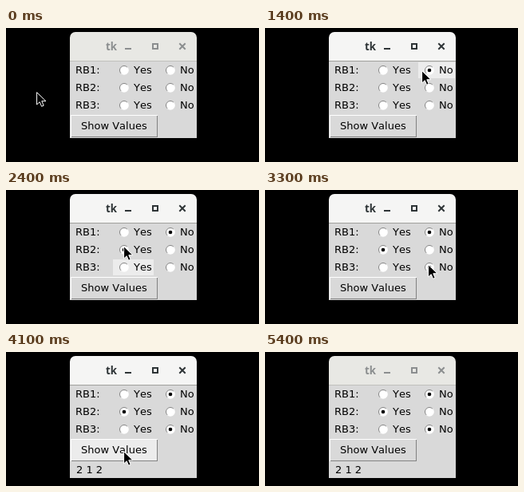
An HTML page that plays this animation: 317x168 px, repeating every 5.5 s.

```html
<!DOCTYPE html>
<html lang="en">
<head>
<meta charset="utf-8">
<title>Radio buttons</title>
<style>
  html, body { margin: 0; width: 100%; height: 100%; overflow: hidden; background: #000; }
  svg { display: block; width: 317px; height: 168px; }
  text {
    font: 13px "DejaVu Sans", Verdana, sans-serif;
    font-kerning: none;
    fill: #000;
    white-space: pre;
  }
  #bar { --ink: #2e3436; --fill: #f5f5f4; --edge: #a1a19d; }
  #bar.idle { --ink: #8b8e8f; --fill: #e8e8e4; --edge: #c0c0bd; }
  #bar text { font: bold 13.3px "Open Sans", "Noto Sans", sans-serif; fill: var(--ink); }
  #bar .icon { fill: none; stroke: var(--ink); stroke-width: 2; }
  .crisp { shape-rendering: crispEdges; }
</style>
</head>
<body>
<svg id="stage" viewBox="0 0 317 168" xmlns="http://www.w3.org/2000/svg">
  <rect width="317" height="168"/>
  <rect id="body" class="crisp" x="80" y="42" width="159" height="96" fill="#d9d9d9"/>
  <g id="bar">
    <path d="M80 42V12a7 7 0 0 1 7-7H232a7 7 0 0 1 7 7V42Z" fill="var(--fill)"/>
    <rect class="crisp" x="80" y="41" width="159" height="1" fill="var(--edge)"/>
    <text x="125" y="28">tk</text>
    <path class="icon crisp" d="M149 26h8M184 20h6v6h-6Z"/>
    <path class="icon" stroke-linecap="square" d="M218 20l6 6M224 20l-6 6"/>
  </g>
  <rect id="hover" class="crisp" height="20" fill="#ececec"/>
  <g id="rows"></g>
  <g id="button" class="crisp">
    <rect id="face" x="82" y="110" width="107" height="26"/>
    <path id="lit" d="M81 137V109H190L189 110H82V136Z"/>
    <path id="shade" d="M190 109V137H81L82 136H189V110Z"/>
  </g>
  <text id="caption" x="94" y="127">Show Values</text>
  <text id="result" x="88" y="152">2 1 2</text>
  <path id="cursor" d="M.6 1.7V17L4.2 13.7L6.6 19.3L9.2 18.2L6.8 12.7H12Z"
        fill="#000" stroke="#fff" stroke-linejoin="round"/>
</svg>
<script>
const LOOP = 5500;
const $ = id => document.getElementById(id);
const set = (el, attrs) => {
  for (const key in attrs) el.setAttribute(key, attrs[key]);
  return el;
};
const add = (parent, tag, attrs, text = "") => {
  const el = set(document.createElementNS("http://www.w3.org/2000/svg", tag), attrs);
  el.textContent = text;
  return parent.appendChild(el);
};
const show = (el, on) => { el.style.display = on ? "" : "none"; };

// Pointer tip: time, x, y
const pointer = [
  [0, 38, 79], [300, 59, 75],
  [500, 84, 73], [600, 132, 65], [700, 182, 55], [800, 196, 52],
  [1500, 182, 57], [1600, 159, 65], [1700, 147, 69],
  [2500, 154, 83], [2600, 188, 91], [2700, 204, 92],
  [3400, 195, 97], [3500, 176, 108], [3600, 157, 117], [3700, 147, 123],
  [4800, 148, 93], [4900, 152, 1], [5000, 152, -40]
];

// Hovered widget: time, name ("" for none)
const hovers = [
  [0, ""], [700, "No1"], [1500, ""], [1600, "Yes2"],
  [2400, "Yes3"], [2500, "No3"], [3300, ""], [3500, "button"],
  [4700, "Yes3"], [4800, ""]
];

const at = (steps, t) => steps.findLast(step => step[0] <= t);
const within = (t, from, to) => t >= from && t < to;

function radio(x, y) {
  const rows = $("rows");
  add(rows, "circle", { cx: x, cy: y, r: 5.8, fill: "#fff" });
  add(rows, "path", {
    d: `M${x - 3.9} ${y + 3.9}A5.5 5.5 0 0 1 ${x + 3.9} ${y - 3.9}`,
    fill: "none", stroke: "#828282"
  });
  return add(rows, "circle", { cx: x, cy: y, r: 2.3, fill: "#000" });
}

const dots = {};
for (let n = 1; n <= 3; n++) {
  const y = 31 + n * 22;
  add($("rows"), "text", { x: 87, y: y + 4 }, `RB${n}:`);
  for (const [name, x, textX] of [["Yes", 148, 160], ["No", 206, 218]]) {
    dots[name + n] = radio(x, y);
    add($("rows"), "text", { x: textX, y: y + 4 }, name);
  }
}

const picked = { No1: 1100, Yes2: 1900, No3: 2900 };

function draw(t) {
  const [, x, y] = at(pointer, t);
  set($("cursor"), { transform: `translate(${x} ${y})` });

  const target = at(hovers, t)[1];
  const onButton = target === "button";
  const onRadio = target !== "" && !onButton;
  show($("hover"), onRadio);
  if (onRadio) {
    const yes = target.startsWith("Yes");
    set($("hover"), {
      x: yes ? 134 : 192,
      y: 21 + 22 * target.at(-1),
      width: yes ? 51 : 46
    });
  }

  for (const name in dots) show(dots[name], t >= picked[name]);

  const down = within(t, 3900, 4100);
  set($("face"), { fill: onButton ? "#ececec" : "#d9d9d9" });
  set($("lit"), { fill: down ? "#828282" : "#fff" });
  set($("shade"), { fill: down ? "#fff" : "#828282" });

  const done = t >= 4100;
  show($("result"), done);
  set($("body"), { height: done ? 116 : 96 });
  $("bar").classList.toggle("idle", !within(t, 1400, 5400));
}

const start = performance.now();
function tick() {
  draw((performance.now() - start) % LOOP);
  requestAnimationFrame(tick);
}
tick();
</script>
</body>
</html>
```
